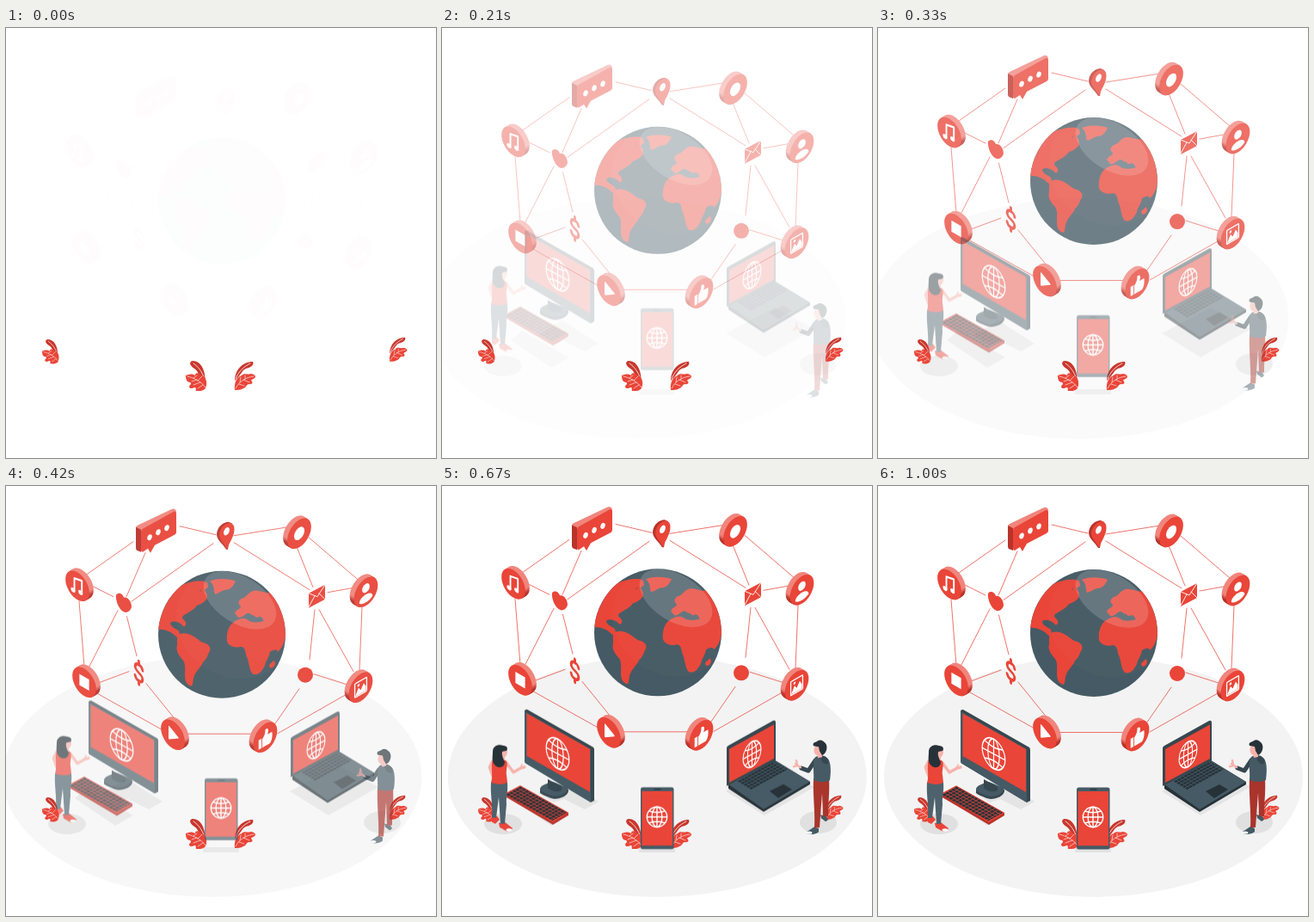
Write an HTML page that moves like this. It is 500 by 500 pixels and loops after 1040 ms.

```html
<!DOCTYPE html>
<html lang="en">
<head>
<meta charset="utf-8">
<title>Connected world</title>
<style>
html, body { margin: 0; width: 100%; height: 100%; overflow: hidden; background: #fff; }
svg { display: block; width: 100%; height: 100%; }
</style>
</head>
<body>
<svg id="stage" viewBox="0 0 500 500"></svg>
<script>
const RED = '#e94538', LIGHT = '#f0857c', DEEP = '#b9332a', SLATE = '#455a64', DARK = '#37474f', INK = '#263238', SKIN = '#f7b3ab';

const path = (d, fill, extra = '') => `<path d="${d}" fill="${fill}" ${extra}/>`;
const line = (d, color, width, extra = '') =>
  `<path d="${d}" fill="none" stroke="${color}" stroke-width="${width}" stroke-linecap="round" stroke-linejoin="round" ${extra}/>`;
const oval = (x, y, rx, ry, fill, extra = '') =>
  `<ellipse cx="${x}" cy="${y}" rx="${rx}" ry="${ry}" fill="${fill}" ${extra}/>`;
const group = (transform, body) => `<g transform="${transform}">${body}</g>`;

// A coin seen at an angle; side is -1 when it faces left, 1 when it faces right.
function coin(x, y, side, mark) {
  const plane = (dx, dy, body) =>
    group(`matrix(.866 ${-side * 0.5} 0 1 ${x + side * 2.5 - side * dx} ${y + 1.5 - dy})`, body);
  let rim = '';
  for (let i = 5; i > 0; i--) rim += plane(i, i * 0.6, '<circle r="16" fill="url(#rim)"/>');
  return rim + plane(0, 0, `<circle r="16" fill="${RED}"/>` + mark);
}

const MARKS = {
  note: line('M-4 7V-7L6 -9V5', '#fff', 2.2) + oval(-5.8, 7.5, 3, 2.6, '#fff') + oval(4.2, 5.5, 3, 2.6, '#fff'),
  square: '<rect x="-6.5" y="-6.5" width="13" height="13" fill="#fff"/>',
  play: path('M-5 -7L7 0L-5 7Z', '#fff', 'stroke="#fff" stroke-width="1.5" stroke-linejoin="round"'),
  disc: '<circle r="7" fill="#fff"/>',
  user: '<circle cy="-4.5" r="5" fill="#fff"/>' + path('M-9 9C-9 1 9 1 9 9C5 13 -5 13 -9 9Z', '#fff'),
  image: '<rect x="-8" y="-8" width="16" height="16" rx="1" fill="none" stroke="#fff" stroke-width="1.5"/>' +
    path('M-7 6L-3 -1L0 3L4 -3L7 2V7H-7Z', '#fff') + '<circle cx="-3" cy="-4" r="1.5" fill="#fff"/>',
  thumb: path('M-9 -1H-5V10H-9ZM-4 0C-1 -2 0 -5 0 -9C4 -10 5 -6 3 -2H9C10 2 9 9 6 10H-4Z', '#fff')
};

function wireGlobe(matrix, r, w) {
  const a = r * 0.8, b = r * 0.6, c = r * 0.3;
  const body = `<circle r="${r}"/><ellipse rx="${r * 0.5}" ry="${r}"/>` +
    `<path d="M0 ${-r}V${r}M${-r} 0H${r}M${-a} ${-b}Q0 ${-c} ${a} ${-b}M${-a} ${b}Q0 ${c} ${a} ${b}"/>`;
  return `<g transform="matrix(${matrix})" fill="none" stroke="#fff" stroke-width="${w}">${body}</g>`;
}

const links = [
  'M94 101L148 63', 'M202 45L244 55', 'M265 56L328 46', 'M352 58L409 107', 'M338 69L357 116',
  'M374 122L402 117', 'M414 139L411 213', 'M364 142L404 214', 'M359 142L353 200', 'M265 64L353 119',
  'M241 65L146 132.5', 'M162 76L140 127', 'M101 115L125 127', 'M85 132L91 208', 'M130 143L97 208',
  'M140.5 150L152 196', 'M143 214L108 227', 'M163 228L197 270', 'M107 240L182 282', 'M211 286.5H287',
  'M312 276L341 234', 'M358 217L396 229', 'M316 286L395 241'
].join('');

const land = [
  // Americas
  'M176 164C180 146 188 128 202 115C212 109 224 108 232 109C230 114 227 117 225 121C229 120 232 123 234 128C232 133 226 136 222 137C219 142 212 145 206 149C203 153 208 153 209 157C210 162 206 163 204 159C198 155 192 155 191 158C192 163 198 164 201 167C202 170 201 171 205 173L200 175C196 172 193 168 188 167C184 164 180 166 176 164Z',
  'M199 173C203 168 211 169 216 172C221 174 223 177 228 180C234 181 239 185 237 190C234 195 234 199 229 203C227 209 221 213 219 219C217 223 218 228 216 231C210 230 208 225 208 218C208 211 209 206 206 201C201 196 197 189 199 184Z',
  'M237 109C246 105 260 106 267 109C265 113 262 119 255 119C250 120 246 124 243 124C241 119 243 114 237 109Z',
  'M228 112L234 110L235 116L231 119L234 125L231 132L225 128Z',
  // Europe, Asia and Africa
  'M266 146C268 141 273 142 273 138C270 136 269 132 274 129C280 128 281 122 288 120C296 119 301 124 307 122C318 134 325 151 325 172C324 180 321 187 316 191C315 187 310 189 307 191C306 198 302 201 301 207C298 213 294 219 287 217C282 211 283 203 280 197C278 192 279 187 274 185C267 187 259 185 257 179C256 171 258 162 264 157C270 152 278 151 281 154C286 158 295 157 300 155C298 152 291 154 289 149C284 149 284 144 279 147C276 149 274 152 270 151Z',
  'M306 208C306 204 310 204 311 201C315 204 312 209 308 210Z'
].join('');

const world =
  `<circle cx="251" cy="171" r="74" fill="${SLATE}"/>` +
  '<g clip-path="url(#ball)">' + path(land, RED) +
  path('M281 150C285 146 288 152 292 151C296 149 298 151 299 154C294 156 288 155 281 150Z', SLATE) +
  oval(266, 158, 70, 62, '#fff', 'opacity=".02" transform="rotate(30 266 158)"') +
  oval(272, 131, 47, 27, '#fff', 'opacity=".16" transform="rotate(32 272 131)"') + '</g>';

const bubble =
  path('M151 47Q151 45 153 44L193 25Q197 24 198 28L157 50Z', LIGHT) +
  path('M151 46L157 49V75L152 73Q151 72 151 70Z', DEEP) +
  path('M157 51Q157 49 159 48L195 28Q198 27 198 30V52Q198 54 196 55L173 67L168 76L165 71L159 75Q157 75 157 73Z', RED) +
  [[167, 58], [177, 52], [187, 47]].map(([x, y]) => oval(x, y, 2.6, 3.6, '#fff', `transform="rotate(20 ${x} ${y})"`)).join('');

const pin =
  path('M256 72C251 64 245 61 245 54C246 45 253 40 259 40L263 42L258 72Z', DEEP) +
  path('M257 72C254 65 248 61 248 55C249 46 256 41 261 41C266 43 266 48 265 53C263 61 259 65 257 72Z', RED) +
  oval(256.5, 51, 3, 5, '#fff', 'transform="rotate(25 256.5 51)"');

const heart = path('M128 125C131 121 136 124 137 128C141 127 146 132 146 139C145 143 141 146 138 145C131 143 127 130 128 125Z', RED);

const mail = path('M352 123L371 113V130L352 140Z', RED) +
  line('M352 123L362 127L371 113M352 139L359 126M371 130L364 123', '#fff', 0.9);

const dollar = group('matrix(.866 .5 0 1 154.5 215.5)',
  line('M5 -5C4 -11 -5 -11 -5 -5C-5 1 5 -1 5 5C5 11 -4 11 -5 5M0 -13.5V-9M0 9V13.5', RED, 3.4));

const network = line(links, RED, 0.75) + world + bubble + pin + heart + mail + dollar +
  `<circle cx="348" cy="218" r="9" fill="${RED}"/>` +
  coin(85.5, 113, -1, MARKS.note) + coin(93.5, 225, -1, MARKS.square) + coin(196.5, 286, -1, MARKS.play) +
  coin(338.5, 52, 1, MARKS.disc) + coin(416, 120, 1, MARKS.user) + coin(410, 231, 1, MARKS.image) +
  coin(299, 289, 1, MARKS.thumb);

const shadows = path('M112 357L140 340L182 367L166 376L142 364L130 368Z', '#e4e4e4') +
  path('M80 363L93 352L148 383L127 395Z', '#e4e4e4') +
  path('M330 355L387 325L433 350L375 383Z', '#e4e4e4') +
  path('M229 420H271V426H229Z', '#e2e2e2') +
  oval(71, 393, 22, 12, '#e0e0e0') + oval(437.5, 391, 21.5, 13, '#e0e0e0');

const leafLeft =
  path('M231.5 410C232 399 227 387 217 387C212 388 214 393 219 396C224 399 223 404 231.5 410Z', '#c9372d') +
  line('M218 390C224 394 228 400 231 408', '#fff', 0.8) +
  path('M209 404C213 402 217 402 220 404C220 400 225 401 227 404C232 404 235 412 232 419C229 423 223 422 221 422C220 420 222 418 219 418C216 420 213 419 213 417C213 415 217 414 214 412C210 412 209 408 209 404Z', RED) +
  line('M211 405C219 407 227 411 232 418M218 407L222 404M223 410L228 405M222 409L216 411M226 412L218 415M229 415L223 419', '#fff', 0.6);
const leafRight =
  path('M266 410C266 398 275 388 287 388C289 392 284 395 279 396C274 398 274 403 266 410Z', '#c9372d') +
  line('M284 390C276 394 270 400 267 408', '#fff', 0.8) +
  path('M266 421C265 413 268 406 274 404C277 400 282 404 284 402C287 402 289 403 290 405C290 408 286 408 285 410C288 412 286 415 283 414C279 414 280 418 276 419C273 421 269 421 266 421Z', RED) +
  line('M267 419C271 411 279 406 288 405M272 412L273 406M278 408L278 404M276 409L283 412M271 414L277 416', '#fff', 0.6);
const plants = leafLeft + leafRight +
  group('translate(-127.3 48.5) scale(.81)', leafLeft) + group('translate(220 30) scale(.85)', leafRight);

const rows = (n, from, step, length, width) => {
  let d = '';
  for (let i = 0; i < n; i++) d += `M1 ${from + i * step}H${length}`;
  return `<path d="${d}" fill="none" stroke="${INK}" stroke-width="${width}" stroke-dasharray="3.6 .7"/>`;
};

const monitor =
  path('M114 354C114 349 122 347 129 345L147 353C148 360 138 364 131 364C124 363 115 358 114 357Z', DARK) +
  path('M114 353C114 348 122 346 129 344L146 351C147 357 138 361 131 361C124 360 115 356 114 353Z', SLATE) +
  path('M123 341L139 350V354C133 357 126 354 123 351Z', DARK) +
  path('M96 262Q96 260 99 260L176 304Q177 305 177 307V366L173 368L98 323Q96 322 96 319Z', DARK) +
  path('M96 262L173 306V368L98 323Q96 322 96 319Z', SLATE) +
  path('M98.5 264.5L172 306V356L98.5 314Z', RED) +
  wireGlobe('.77 .42 0 1 134.5 311.5', 17.3, 1.6);

const keyboard =
  path('M73 358L91 348.5L147 380V383L129 394L73 361Z', DEEP) +
  path('M73 358L91 348.5L147 380L129 391Z', RED) +
  group('matrix(.87 .49 -.85 .47 91 348.8)', rows(5, 2.4, 4.1, 63, 3.4));

const laptop =
  path('M333 347L387 319L428 344V347L374 379L333 352Z', INK) +
  path('M333 347L387 319L428 344L374 376Z', SLATE) +
  group('matrix(.866 -.48 .82 .5 343 344)', rows(5, 1.5, 4, 50, 3)) +
  path('M381 355L397 347L407 353L391 363Z', INK) +
  path('M331 305Q331 303 333 302L385 273Q388 272 388 275V320L331 349Z', DARK) +
  path('M334 306L386 277.5V317L334 345Z', RED) +
  wireGlobe('.72 -.4 0 1 360.5 312', 14.5, 1.5);

const phone =
  `<rect x="231" y="350.5" width="38.5" height="72" rx="2.5" fill="${SLATE}"/>` +
  `<rect x="232.5" y="355" width="35.5" height="63.3" fill="${RED}"/>` +
  line('M247 352.8H254', INK, 1.2) + wireGlobe('1 0 0 1 250 385', 11.7, 1.4);

const woman =
  path('M66 392L73 391L82 398C81 402 77 402 74 401L67 397Z', RED) + oval(78, 400, 3.5, 1.8, '#fff') +
  path('M58 384L64 384L67 388L62 393L58 391Z', RED) +
  path('M57 345L76 345C77 357 74 362 75 370L73 393H68L66 362L63 386H58C59 370 56 358 57 345Z', '#4d626d') +
  line('M75 322L83 333L92 328L96 327', SKIN, 3.4) + line('M91 328L93 324', SKIN, 1.6) +
  line('M59 320L55.5 327L59 337', SKIN, 3.8) +
  path('M59 318C64 315 72 317 75 320C77 325 74 331 75 336L76 345C70 348 63 347 57 345C60 336 56 327 59 318Z', RED) +
  oval(71, 309.5, 5, 6.5, SKIN) + path('M67 313H73V319L69 321Z', SKIN) +
  path('M59 309C59 302 66 300 71 302C76 302 77 306 75 308L70 309C69 313 71 317 73 321C73 326 68 329 63 326C57 322 59 315 59 309Z', INK);

const man =
  path('M424 402L433 396L438 398V402C433 406 426 405 424 404Z', SLATE) + oval(427, 403, 3.4, 1.6, '#fff') +
  path('M440 382L447 384L449 388L446 390L441 386Z', SLATE) +
  path('M432 340H450C451 356 449 366 449 384H443L442 357L439 397H433C434 378 431 360 432 340Z', '#a9342c') +
  line('M434 319L426 331L418 328', DARK, 5) + line('M417 327L411 323M414 325L409 326M413 324L412 319', SKIN, 2.4) +
  path('M434 315C438 312 445 313 449 317C453 323 452 334 451 342C445 345 437 344 432 342C433 333 430 321 434 315Z', SLATE) +
  path('M440 313C447 313 451 318 449 323C444 324 440 320 440 313Z', DARK) +
  oval(437, 307, 4.6, 6, SKIN) + path('M436 309H442V315L437 316Z', SKIN) +
  path('M432 302C430 297 436 298 437 296C441 294 444 297 446 299C449 303 447 311 442 313L439 308L438 303Z', INK);

document.getElementById('stage').innerHTML =
  `<defs><clipPath id="ball"><circle cx="251" cy="171" r="74"/></clipPath>
  <linearGradient id="rim" x1="0" y1="0" x2="0" y2="1"><stop offset=".45" stop-color="${LIGHT}"/><stop offset=".62" stop-color="${DEEP}"/></linearGradient></defs>` +
  `<g id="floor">${oval(250.5, 338, 243.5, 140, '#f3f3f3')}</g><g id="shade">${shadows}</g>${plants}` +
  `<g id="network">${network}</g><g id="devices">${monitor + keyboard + laptop + phone + woman}</g><g id="man">${man}</g>`;

// Cubic Bezier easing, solved by bisection.
const bezier = (x1, y1, x2, y2) => x => {
  if (x <= 0) return 0;
  if (x >= 1) return 1;
  const at = (a, b, s) => 3 * (1 - s) * (1 - s) * s * a + 3 * (1 - s) * s * s * b + s ** 3;
  let lo = 0, hi = 1;
  for (let i = 0; i < 24; i++) {
    const mid = (lo + hi) / 2;
    if (at(x1, x2, mid) < x) lo = mid; else hi = mid;
  }
  return at(y1, y2, lo);
};
const bounce = bezier(0.36, -0.01, 0.5, 1.38);
const smooth = bezier(0.42, 0, 0.58, 1);

function place(id, p, dx, dy) {
  const el = document.getElementById(id);
  el.setAttribute('opacity', Math.max(0, Math.min(1, p)));
  el.setAttribute('transform', `translate(${dx * (1 - p)} ${dy * (1 - p)})`);
}

const LOOP = 1040, STEP = 1000 / 24;
function draw(now) {
  const t = Math.floor((now % LOOP + 5) / STEP) * STEP;
  const up = bounce((t + 40) / 730), slide = smooth(t / 708);
  place('network', up, 0, 30);
  place('floor', slide, -30, 0);
  place('shade', slide, 0, 0);
  place('devices', slide, 0, -30);
  place('man', slide, 0, 30);
}
const start = performance.now();
function tick() {
  draw(performance.now() - start);
  requestAnimationFrame(tick);
}
tick();
</script>
</body>
</html>
```
